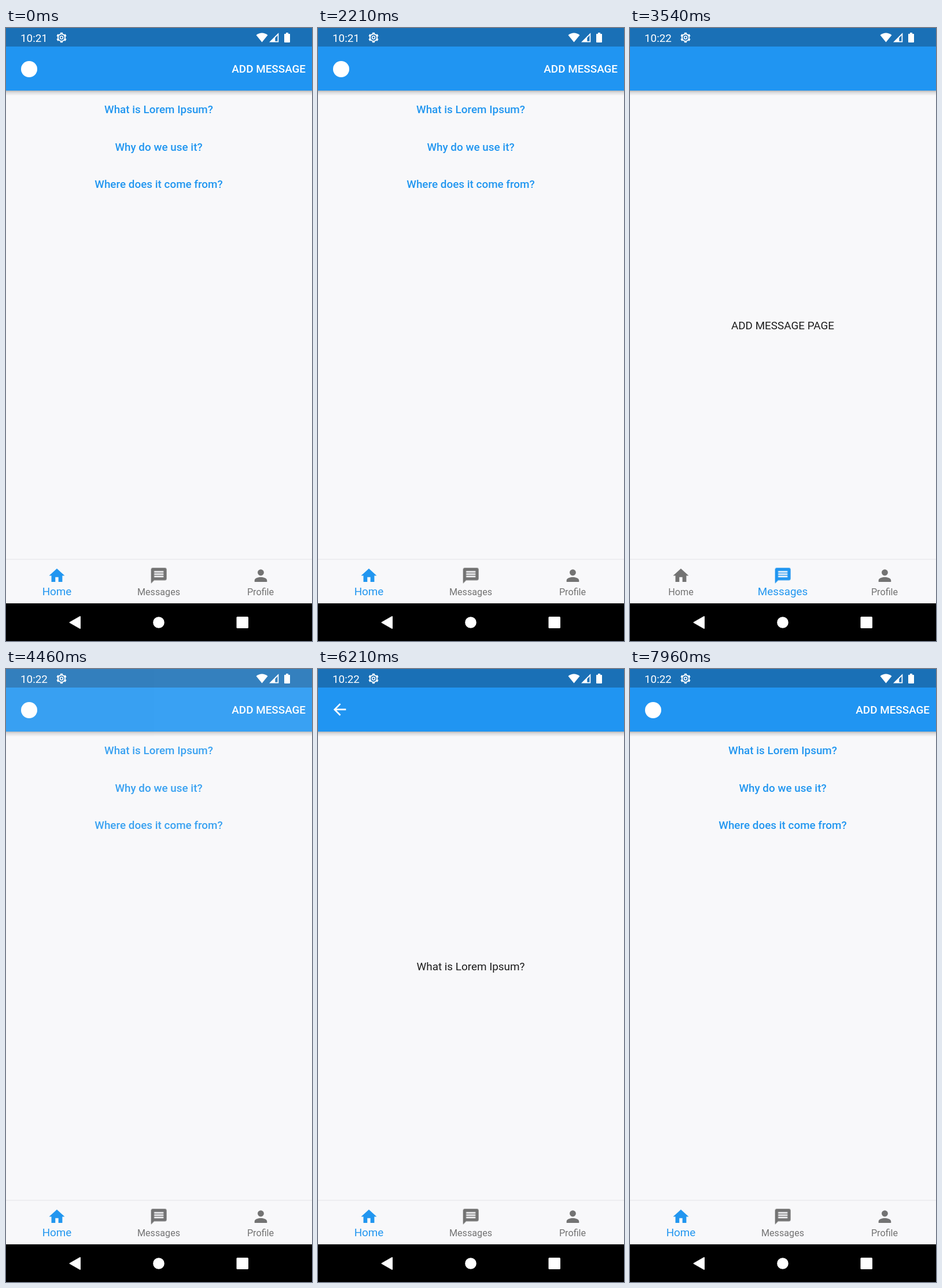
Animation of 529x1058 px, one loop 8000 ms. Source, as an HTML page:

```html
<!DOCTYPE html>
<html lang="en">
<head>
<meta charset="utf-8">
<title>Tabbed app</title>
<style>
html, body { margin: 0; width: 100%; height: 100%; overflow: hidden; background: #f8f8fa; }
svg { display: block; width: 100vw; height: 100vh; font: 400 18.86px Roboto, sans-serif; }
.mid { text-anchor: middle; }
.link { font-weight: 500; fill: #2196f0; text-anchor: middle; }
.white { fill: #fff; }

.home, .add, .detail, .early, .late, .tab, .tab text { animation: 8s infinite both; }
.home { animation-name: home; }
.add { animation-name: add; }
.detail { animation-name: detail-fade; }
.slide { animation: detail-slide 8s infinite both; }
.early { animation-name: early; }
.late { animation-name: late; }
.tab { fill: #737373; }
.tab text { transform: scale(.857); text-anchor: middle; }
.tab.first { animation-name: first-color; }
.tab.first text { animation-name: first-size; }
.tab.second { animation-name: second-color; }
.tab.second text { animation-name: second-size; }

/* Tab switch: the new page fades in over the empty scaffold. */
@keyframes home {
  0%, 32.5% { opacity: 1; }
  32.501% { opacity: 0; }
  53.5% { opacity: 0; animation-timing-function: ease; }
  57.25%, 100% { opacity: 1; }
}
@keyframes add {
  0% { opacity: 0; }
  32.5% { opacity: 0; animation-timing-function: ease; }
  36.25%, 53.5% { opacity: 1; }
  53.501%, 100% { opacity: 0; }
}

/* Pushed page: fades in while rising, then the reverse. */
@keyframes detail-fade {
  0% { opacity: 0; }
  70.375% { opacity: 0; animation-timing-function: ease-in; }
  74.125% { opacity: 1; }
  91.625% { opacity: 1; animation-timing-function: ease-out; }
  95.375%, 100% { opacity: 0; }
}
@keyframes detail-slide {
  0% { transform: translateY(229px); }
  70.375% { transform: translateY(229px); animation-timing-function: cubic-bezier(.4, 0, .2, 1); }
  74.125% { transform: none; }
  91.625% { transform: none; animation-timing-function: cubic-bezier(.8, 0, .6, 1); }
  95.375%, 100% { transform: translateY(229px); }
}

@keyframes first-color {
  0%, 32.5% { fill: #2196f0; animation-timing-function: cubic-bezier(.4, 0, .2, 1); }
  35%, 53.5% { fill: #737373; animation-timing-function: cubic-bezier(.4, 0, .2, 1); }
  56%, 100% { fill: #2196f0; }
}
@keyframes first-size {
  0%, 32.5% { transform: scale(1); animation-timing-function: cubic-bezier(.4, 0, .2, 1); }
  35%, 53.5% { transform: scale(.857); animation-timing-function: cubic-bezier(.4, 0, .2, 1); }
  56%, 100% { transform: scale(1); }
}
@keyframes second-color {
  0%, 32.5% { fill: #737373; animation-timing-function: cubic-bezier(.4, 0, .2, 1); }
  35%, 53.5% { fill: #2196f0; animation-timing-function: cubic-bezier(.4, 0, .2, 1); }
  56%, 100% { fill: #737373; }
}
@keyframes second-size {
  0%, 32.5% { transform: scale(.857); animation-timing-function: cubic-bezier(.4, 0, .2, 1); }
  35%, 53.5% { transform: scale(1); animation-timing-function: cubic-bezier(.4, 0, .2, 1); }
  56%, 100% { transform: scale(.857); }
}

@keyframes early {
  0%, 33.5% { opacity: 1; }
  33.501%, 100% { opacity: 0; }
}
@keyframes late {
  0%, 33.5% { opacity: 0; }
  33.501%, 100% { opacity: 1; }
}
</style>
</head>
<body>
<svg viewBox="0 0 529 1058" preserveAspectRatio="none">
  <defs>
    <linearGradient id="shade" x2="0" y2="1">
      <stop offset="0" stop-color="#000" stop-opacity=".32"/>
      <stop offset=".4" stop-color="#000" stop-opacity=".12"/>
      <stop offset="1" stop-color="#000" stop-opacity="0"/>
    </linearGradient>
    <clipPath id="body"><path d="M0 0h529v917H0z"/></clipPath>
    <g id="page">
      <path fill="#f8f8fa" d="M0 0h529v917H0z"/>
      <path fill="url(#shade)" d="M0 107h529v10H0z"/>
      <path fill="#2095f2" d="M0 0h529v108H0z"/>
      <path fill="#1a70b6" d="M0 0h529v32H0z"/>
    </g>
  </defs>

  <path fill="#f8f8fa" d="M0 0h529v1058H0z"/>

  <g clip-path="url(#body)">
    <g class="home">
      <use href="#page"/>
      <circle class="white" cx="40" cy="71" r="14"/>
      <text class="white" x="518" y="77" text-anchor="end" font-weight="500">ADD MESSAGE</text>
      <text class="link" x="264" y="147">What is Lorem Ipsum?</text>
      <text class="link" x="264" y="211.5">Why do we use it?</text>
      <text class="link" x="264" y="276">Where does it come from?</text>
    </g>
    <g class="add">
      <use href="#page"/>
      <text class="mid" x="264" y="519.5" fill="#1c1c1c">ADD MESSAGE PAGE</text>
    </g>
    <g class="detail">
      <g class="slide">
        <use href="#page"/>
        <path class="white" transform="translate(21.4 53.8) scale(1.347)" d="M20 11H7.83l5.59-5.59L12 4l-8 8 8 8 1.41-1.41L7.83 13H20z"/>
        <text class="mid" x="264" y="519.5" fill="#1c1c1c">What is Lorem Ipsum?</text>
      </g>
    </g>
  </g>

  <!-- bottom tabs -->
  <path fill="#f8f8fa" d="M0 917h529v76H0z"/>
  <path fill="#ededf0" d="M0 916h529v2H0z"/>
  <g class="tab first">
    <path transform="translate(71.8 929) scale(1.347)" d="M10 20v-6h4v6h5v-8h3L12 3 2 12h3v8z"/>
    <g transform="translate(88 979)"><text>Home</text></g>
  </g>
  <g class="tab second">
    <path transform="translate(248 929) scale(1.347)" d="M20 2H4c-1.1 0-1.99.9-1.99 2L2 22l4-4h14c1.1 0 2-.9 2-2V4c0-1.1-.9-2-2-2zm-2 12H6v-2h12zm0-3H6V9h12zm0-3H6V6h12z" fill-rule="evenodd"/>
    <g transform="translate(264 979)"><text>Messages</text></g>
  </g>
  <g class="tab">
    <path transform="translate(424.3 929) scale(1.347)" d="M12 12c2.21 0 4-1.79 4-4s-1.79-4-4-4-4 1.79-4 4 1.79 4 4 4zm0 2c-2.67 0-8 1.34-8 4v2h16v-2c0-2.66-5.33-4-8-4z"/>
    <g transform="translate(440 979)"><text>Profile</text></g>
  </g>

  <!-- system navigation -->
  <path d="M0 993h529v65H0z"/>
  <g class="white">
    <path d="M128 1016v20l-17.5-10z" stroke="#fff" stroke-width="2" stroke-linejoin="round"/>
    <circle cx="264" cy="1026" r="9.8"/>
    <rect x="398.5" y="1016" width="20.5" height="20" rx="1.5"/>
  </g>

  <!-- status bar -->
  <g class="white">
    <text class="early" x="25" y="23.5">10:21</text>
    <text class="late" x="25" y="23.5">10:22</text>
    <g transform="translate(96 16.5)" fill="none" stroke="#fff">
      <circle r="6.1" stroke-width="1.9"/>
      <circle r="7.7" stroke-width="2.2" pathLength="12" stroke-dasharray="1 1" transform="rotate(15)"/>
      <circle r="2.5" stroke-width="1.6"/>
    </g>
    <path d="M432.5 12.3Q442.5 4.8 452.5 12.3L442.5 24.5z"/>
    <path d="M455 24.5L471.3 8.2v16.3zM465.3 16.9v5.8h4.2V12.6z" fill-rule="evenodd"/>
    <path d="M484 8h4v2h2q1 0 1 1v13q0 1-1 1h-8q-1 0-1-1V11q0-1 1-1h2z"/>
  </g>
</svg>
</body>
</html>
```
